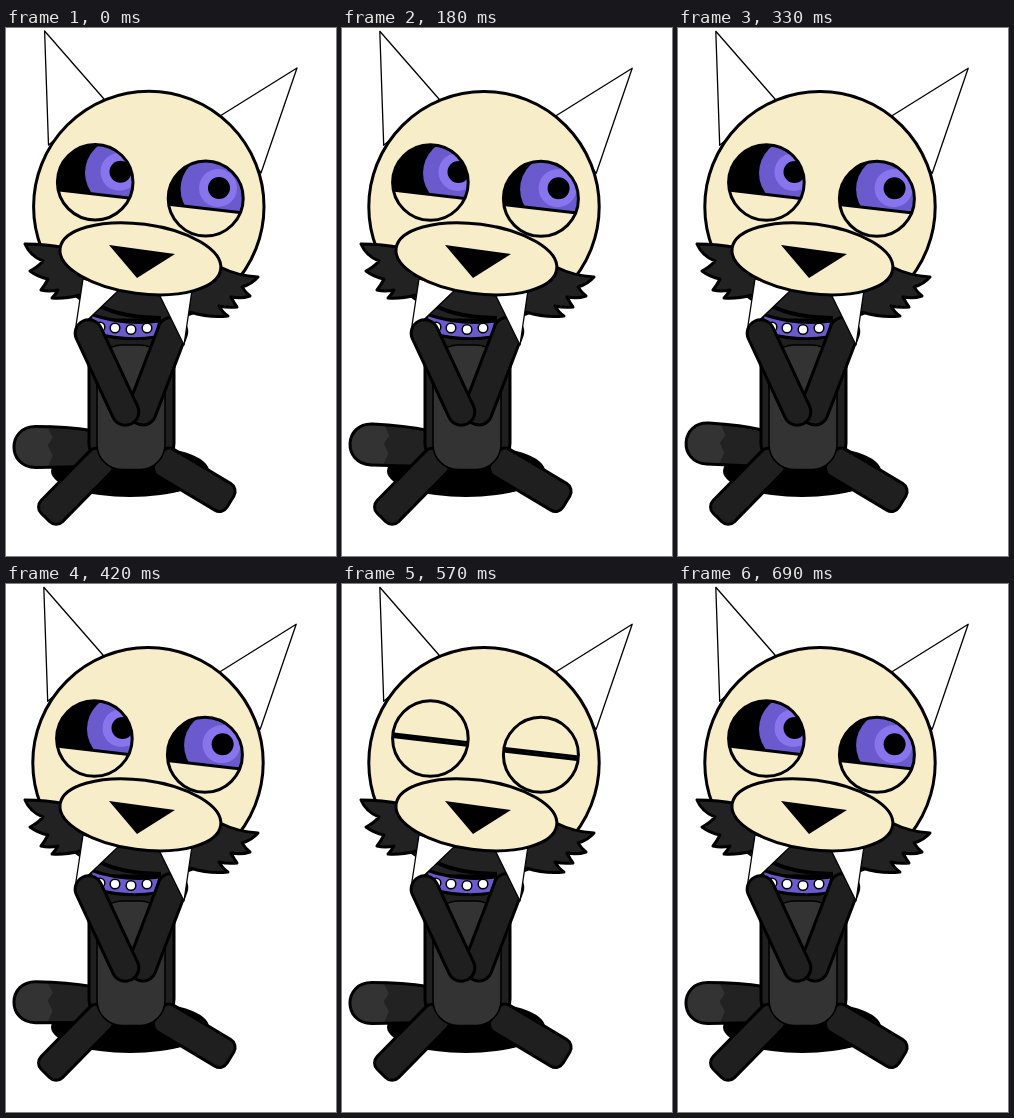
Write an HTML page with a canvas that moves like this. It is 330 px wide and 528 px high and loops after 720 ms.

```html
<!DOCTYPE html>
<html lang="en">
<head>
<meta charset="utf-8">
<title>Cat blink</title>
<style>
  html, body { margin: 0; width: 100%; height: 100%; overflow: hidden; background: #fff; }
  canvas { display: block; width: 100vw; height: 100vh; }
</style>
</head>
<body>
<canvas width="330" height="528"></canvas>
<script>
const ctx = document.querySelector("canvas").getContext("2d");
const LOOP = 720, STEP = 30;
const CREAM = "#f7edc8", DARK = "#1f1f1f", GREY = "#333", FUR = "#222";
const IRIS = "#6a5acd", RING = "#8875ee";

const clamp = v => Math.max(0, Math.min(1, v));
const easeOut = v => 1 - (1 - clamp(v)) ** 2;

function paint(path, fill, width = 3) {
  if (fill) {
    ctx.fillStyle = fill;
    ctx.fill(path);
  }
  if (width) {
    ctx.lineWidth = width;
    ctx.strokeStyle = "#000";
    ctx.stroke(path);
  }
}

const shape = (d, fill, width) => paint(new Path2D(d), fill, width);

function ellipse(x, y, rx, ry, fill, width = 3, angle = 0) {
  const path = new Path2D();
  path.ellipse(x, y, rx, ry, angle, 0, Math.PI * 2);
  paint(path, fill, width);
}

const circle = (x, y, r, fill, width) => ellipse(x, y, r, r, fill, width);

function roundRect(x, y, w, h, r, fill, width) {
  const path = new Path2D();
  path.roundRect(x, y, w, h, r);
  paint(path, fill, width);
}

// Rounded bar lying along the line from (x1, y1) to (x2, y2).
function limb(x1, y1, x2, y2, thick, radius) {
  const length = Math.hypot(x2 - x1, y2 - y1);
  ctx.save();
  ctx.translate(x1, y1);
  ctx.rotate(Math.atan2(y2 - y1, x2 - x1));
  roundRect(0, -thick / 2, length, thick, radius, DARK);
  ctx.restore();
}

function tail(lift) {
  ctx.save();
  ctx.translate(86, 419.5);
  ctx.rotate(lift * 0.075);
  ctx.translate(-86.3, -420);
  const outline = "M86 403 Q62 399 30 399 C1 399 1 440 30 440 L86 439";
  shape(outline, GREY, 0);
  shape("M42 400 L47 410 L42 418 L47 428 L42 440 L86 439 V403 Q66 400 42 400Z", FUR, 0);
  shape(outline);
  ctx.restore();
}

function fur() {
  shape(`M19 216 Q40 216 60 220 L214 239 Q232 248 252 249
    Q246 256 236 259 Q240 265 244 268 Q235 271 225 269 Q228 275 231 279
    Q222 280 213 278 Q217 285 222 288 Q203 290 184 284
    L165 296 H90 L74 267 Q59 271 46 270 Q50 266 52 262
    Q43 264 35 262 Q39 257 42 251 Q32 249 24 243 Q32 239 37 233 Q24 228 19 216Z`, FUR);
}

function collar() {
  shape("M94 278 Q114 289 155 290", null, 4);
  shape("M84 286 Q118 298 154 293 L150 309 Q120 314 88 305Z", IRIS);
  for (const [x, y] of [[94, 299], [109, 300], [125, 301.5], [141, 300]])
    circle(x, y, 4.8, "#fff", 1.5);
}

function torso() {
  roundRect(83, 292, 85, 145, 22, DARK);
  limb(101, 427, 39.5, 489.5, 30, 9);
  limb(152, 430, 224.5, 473.5, 31, 9);
  roundRect(91, 317, 68, 124.5, 25, GREY, 1.6);
  collar();
  limb(171, 291, 131, 395.5, 29, 13);
}

// "crease" is where the lids meet, relative to the centre of the eye.
function eye({ x, y, r, look, irisShift, crease }, shut) {
  const slope = 0.115;
  const lid = (height, edge) => {
    const left = y + height - slope * 50, right = y + height + slope * 50;
    shape(`M${x - 50} ${left} L${x + 50} ${right} V${edge} H${x - 50}Z`, CREAM);
  };
  const open = 1 - shut;
  ctx.save();
  ctx.beginPath();
  ctx.arc(x, y, r, 0, Math.PI * 2);
  ctx.clip();
  ctx.fillStyle = "#000";
  ctx.fillRect(x - r, y - r, r * 2, r * 2);
  const px = x + look, py = y - 10.5;
  circle(px - irisShift, py + 1, 34, IRIS, 0);
  circle(px - 1, py, 19, RING, 0);
  circle(px, py, 11, "#000", 0);
  lid(crease - 42 * open, y - 100);
  lid(crease + 10 * open, y + 100);
  ctx.restore();
  circle(x, y, r);
}

function draw(t) {
  const settle = easeOut(t / 90);
  const lift = t > 60 && t < 480 ? Math.sin((t - 60) / 420 * Math.PI) ** 2 : 0;
  const shut = t < 577 ? clamp((t - 445) / 132) : clamp((690 - t) / 113);
  const dx = -0.8 * settle, dy = 0.3 * settle;

  ctx.fillStyle = "#fff";
  ctx.fillRect(0, 0, 330, 528);
  ctx.lineJoin = "round";

  ctx.save();
  ctx.translate(dx, dy);
  shape("M42.5 117 L38.6 3 L98 71Z", "#fff", 1.3);
  shape("M214 88 L291 40 L255 145Z", "#fff", 1.3);
  circle(142.8, 178.5, 115.2, CREAM);
  ctx.restore();

  ellipse(124, 443, 79, 26, "#000", 0);
  tail(lift);
  fur();
  torso();
  shape("M77 251 L69 304 L113 262Z", "#fff", 1.3);
  shape("M152 264 L178 317 L186 262Z", "#fff", 1.3);
  limb(77, 293, 125, 396, 27, 13.5);

  ctx.save();
  ctx.translate(dx, dy);
  eye({ x: 89.2, y: 154.2, r: 37.8, look: 25.3 + 2.8 * settle, irisShift: 1.5, crease: 2 }, shut);
  eye({ x: 199.7, y: 170.5, r: 37.5, look: 13.3 + 4.4 * settle, irisShift: 4.5, crease: 0 }, shut);
  ctx.restore();

  ellipse(134.4, 230.8, 81, 34.8, CREAM, 3, 0.13);
  shape("M103 217 L169 226 L131 250Z", "#000", 0);
}

function tick(now) {
  draw(Math.floor(now % LOOP / STEP) * STEP);
  requestAnimationFrame(tick);
}
requestAnimationFrame(tick);
</script>
</body>
</html>
```
